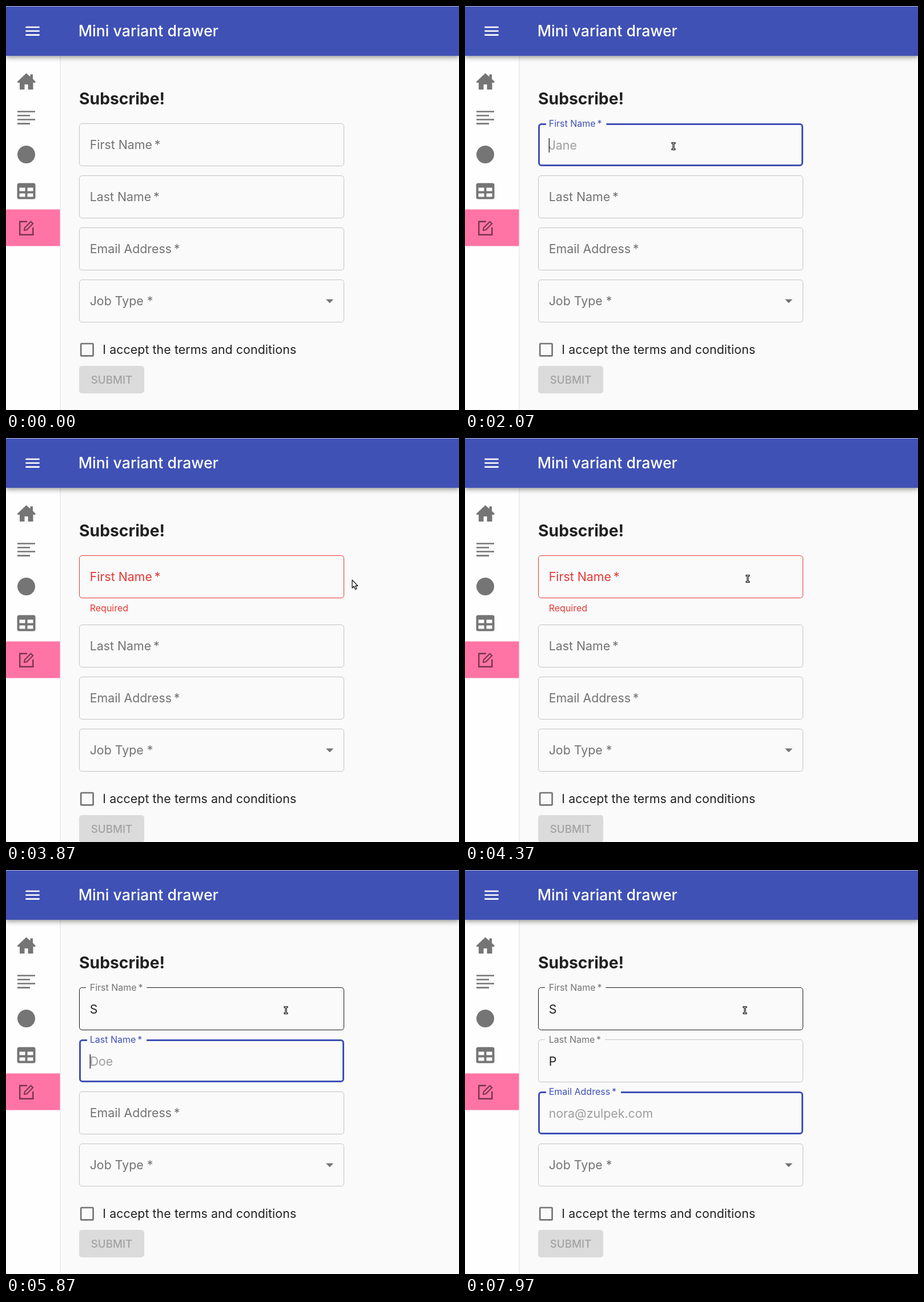
An HTML page that plays this animation: 793 px wide and 706 px high, repeating every 8 s.

```html
<!DOCTYPE html>
<html lang="en">
<head>
<meta charset="utf-8">
<title>Subscribe form</title>
<style>
  html, body { margin: 0; width: 100%; height: 100%; overflow: hidden; background: #fafafa; }
  body, svg text { font-family: Inter, sans-serif; }
  header { position: absolute; top: 0; left: 0; width: 793px; height: 86px; background: #3f51b5;
    border-top: 1px solid #b4bbe2;
    box-shadow: 0 3px 5px -1px rgba(0,0,0,.2), 0 5px 7px rgba(0,0,0,.14), 0 1px 13px rgba(0,0,0,.12); }
  svg { position: absolute; top: 0; left: 0; display: block; }
  .label, .value, .hint, .terms { font-size: 21.33px; }
  .value, .hint, .terms { fill: #212121; }
  .terms { letter-spacing: .08px; }
  .helper { font-size: 16px; fill: #e53935; }
  .icon { fill: #757575; }
  .line { fill: none; stroke: #757575; stroke-width: 2.7; }
</style>
</head>
<body>
<svg width="793" height="706" viewBox="0 0 793 706">
  <rect width="95" height="706" fill="#fefefe"/>
  <rect x="94.5" width="1" height="706" fill="#e0e0e0"/>
  <rect y="355.5" width="94.5" height="64" fill="#ff74a4"/>

  <path class="icon" d="M35.5 117.5 L42.5 123.5 V119.5 H47 V127.5 L52 132.5 L51 134 H47.5 V146 H38.5 V137 H32.5 V146 H24 V134 H20.5 L19.5 132.5 Z"/>
  <path class="line" d="M20 184.5H51 M20 191.5H42 M20 198.5H51 M20 205.7H42"/>
  <circle class="icon" cx="35.5" cy="259.5" r="15.5"/>
  <rect class="icon" x="19.5" y="309.5" width="32" height="28" rx="3.5"/>
  <path fill="#fefefe" d="M23.5 317.5h10v6h-10z M37.5 317.5h10v6h-10z M23.5 327.5h10v6h-10z M37.5 327.5h10v6h-10z"/>
  <g fill="none" stroke="#75354b" stroke-width="2.4">
    <path d="M37 376.7H24.2V399.8H47.3V387"/>
    <path stroke-width="2" d="M32 391.8 L32.7 387.6 L43.6 376.7 L47.2 380.3 L36.3 391.2 Z"/>
  </g>

  <text x="128" y="172" font-size="28.3" font-weight="700" fill="#212121">Subscribe!</text>
  <g id="fields"></g>
  <text id="helper" class="helper" x="146.7" y="303">Required</text>

  <g id="footer">
    <path class="icon" d="M560 512.5h13.4l-6.7 6.7z"/>
    <rect class="line" x="131.2" y="590" width="21.4" height="21.4" rx="1.5"/>
    <text class="terms" x="169.3" y="608">I accept the terms and conditions</text>
    <rect x="128" y="629" width="114" height="48" rx="5" fill="#dbdbdb"/>
    <text x="185" y="660" text-anchor="middle" font-size="18.67" font-weight="500" fill="#a2a2a2">SUBMIT</text>
  </g>
</svg>

<header></header>

<svg width="793" height="706" viewBox="0 0 793 706">
  <path stroke="#fff" stroke-width="2.6" d="M34.3 37h24.4 M34.3 43.8h24.4 M34.3 50.6h24.4"/>
  <text x="126.7" y="53" font-size="26.67" font-weight="500" fill="#fff">Mini variant drawer</text>
  <path id="arrow" fill="#fff" stroke="#000" stroke-width="1.2" stroke-linejoin="round"
    d="M.5 .5V14.5L3.7 11.6L6 17L8.4 16L6.1 10.8H10.3Z"/>
  <g id="beam" fill="none">
    <path stroke="#000" stroke-width="3.2" d="M-3.5 -5.5H3.5M-3.5 5.5H3.5M0 -6V6"/>
    <path stroke="#fff" stroke-width="1" d="M-2.5 -5.5H2.5M-2.5 5.5H2.5M0 -6V6"/>
  </g>
</svg>

<script>
const LOOP = 8000, LEFT = 128, RIGHT = 592, TEXT_X = 146.7;
const BLUE = '#3f51b5', RED = '#e53935', DARK = '#181818', GREY = '#737373', PALE = '#c3c3c3';
const ERROR = [3550, 5400], ERROR_SHIFT = 30;

// focus: spans with the caret; raised: spans with the label on the border
const specs = [
  { label: 'First Name\u2009*', hint: 'Jane', value: 'S', typed: 5400,
    focus: [[1800, 3550], [4700, 5690]], raised: [[1800, 3550], [4700, Infinity]] },
  { label: 'Last Name\u2009*', hint: 'Doe', value: 'P', typed: 6600,
    focus: [[5690, 7400]], raised: [[5690, Infinity]] },
  { label: 'Email Address\u2009*', hint: 'nora@zulpek.com', value: '', typed: Infinity,
    focus: [[7400, Infinity]], raised: [[7400, Infinity]] },
  { label: 'Job Type *', hint: '', value: '', typed: Infinity, focus: [], raised: [] }
];

// time, x, y of the pointer's hot spot
const track = [
  [350, 800, 262], [820, 430, 252], [1150, 365, 245], [2600, 365, 245],
  [3100, 638, 244], [3350, 638, 244], [3500, 687, 248], [3620, 687, 248],
  [4150, 510, 247], [4370, 495, 246], [4620, 490, 245], [LOOP, 490, 245]
];

const $ = id => document.getElementById(id);
const clamp = x => Math.max(0, Math.min(1, x));
const easeOut = x => 1 - (1 - clamp(x)) ** 3;
const within = (t, [a, b]) => t >= a && t < b;
const show = (el, on) => el.setAttribute('visibility', on ? 'visible' : 'hidden');
const move = (el, x, y, more = '') => el.setAttribute('transform', `translate(${x} ${y})${more}`);

function add(parent, tag, attrs, text = '') {
  const el = document.createElementNS('http://www.w3.org/2000/svg', tag);
  for (const k in attrs) el.setAttribute(k, attrs[k]);
  el.textContent = text;
  return parent.appendChild(el);
}

const fields = specs.map((spec, i) => {
  const g = add($('fields'), 'g', {});
  return { ...spec, g, top: 205 + 91 * i,
    border: add(g, 'path', { fill: 'none' }),
    labelEl: add(g, 'text', { class: 'label' }, spec.label),
    hintEl: add(g, 'text', { class: 'hint', x: TEXT_X, y: 46 }, spec.hint),
    valueEl: add(g, 'text', { class: 'value', x: TEXT_X, y: 46 }, spec.value),
    caret: add(g, 'rect', { y: 26, width: 1.3, height: 25, fill: DARK }) };
});

function outline(inset, gapStart, gapEnd) {
  const l = LEFT + inset, r = RIGHT - inset, t = inset, b = 75 - inset, c = 5 - inset / 2;
  const arc = (x, y) => `A${c} ${c} 0 0 1 ${x} ${y}`;
  return `M${gapEnd} ${t}H${r - c}${arc(r, t + c)}V${b - c}${arc(r - c, b)}` +
    `H${l + c}${arc(l, b - c)}V${t + c}${arc(l + c, t)}H${gapStart}`;
}

function pointerAt(t) {
  if (t < track[0][0]) return null;
  const i = track.findIndex(k => k[0] > t);
  const [t0, x0, y0] = track[i - 1], [t1, x1, y1] = track[i];
  const u = (t - t0) / (t1 - t0), s = u * u * (3 - 2 * u);
  return { x: x0 + (x1 - x0) * s, y: y0 + (y1 - y0) * s };
}

function drawField(f, t, hovered, failed, shift) {
  const span = f.focus.find(s => within(t, s));
  const typed = t >= f.typed;
  const up = f.raised.reduce((p, [a, b]) => p + easeOut((t - a) / 200) - easeOut((t - b) / 200), 0);
  const width = span ? 3 : 1;
  const accent = failed ? RED : span ? BLUE : null;

  move(f.g, 0, f.top + shift);
  move(f.labelEl, TEXT_X, 45 - 39.5 * up, ` scale(${1 - .25 * up})`);
  f.labelEl.setAttribute('fill', accent || GREY);

  const gapStart = span ? 142 : 140;
  const gapEnd = TEXT_X + f.labelEl.getComputedTextLength() * .75 + (span ? 8 : 7);
  f.border.setAttribute('d', outline(width / 2, gapStart, gapStart + (gapEnd - gapStart) * up));
  f.border.setAttribute('stroke', accent || (hovered ? DARK : PALE));
  f.border.setAttribute('stroke-width', width);

  f.hintEl.setAttribute('opacity', typed ? 0 : .42 * up);
  show(f.valueEl, typed);
  const since = span && (typed ? Math.max(span[0], f.typed) : span[0]);
  show(f.caret, span && Math.floor((t - since) / 500) % 2 === 0);
  f.caret.setAttribute('x', TEXT_X + (typed ? f.valueEl.getComputedTextLength() : 0));
}

function render(t) {
  const failed = within(t, ERROR), shift = failed ? ERROR_SHIFT : 0;
  const p = pointerAt(t);
  const hovered = p && p.x > LEFT && p.x < RIGHT && p.y > 205 && p.y < 280;

  fields.forEach((f, i) => drawField(f, t, !i && hovered, !i && failed, i ? shift : 0));
  show($('helper'), failed);
  move($('footer'), 0, shift);
  show($('beam'), hovered);
  show($('arrow'), p && !hovered);
  if (p) move(hovered ? $('beam') : $('arrow'), p.x, p.y);
}

const start = performance.now();
function tick() {
  render((performance.now() - start) % LOOP);
  requestAnimationFrame(tick);
}
tick();
</script>
</body>
</html>
```
